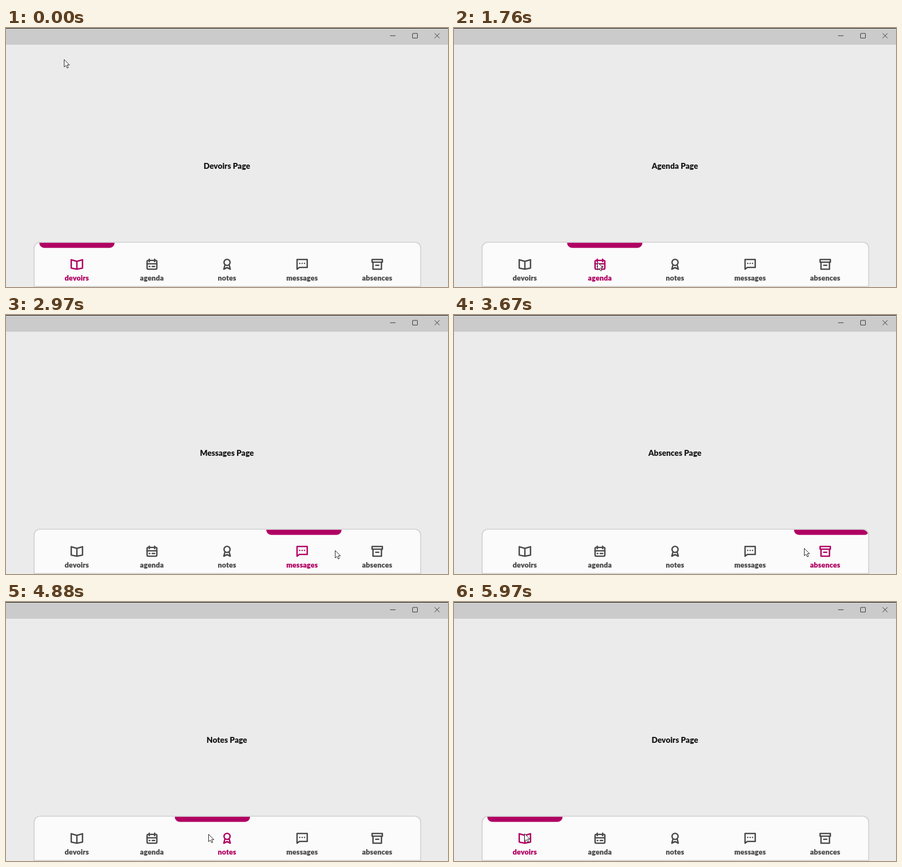
An HTML page for the animation above (6 s loop, 817x480 px).

```html
<!DOCTYPE html>
<html lang="fr">
<head>
<meta charset="utf-8">
<title>Navigation</title>
<style>
  html, body { margin: 0; width: 100%; height: 100%; overflow: hidden; background: #ebebeb; }
  svg { display: block; width: 817px; height: 480px; }
  text { font-family: Lato, "Open Sans", sans-serif; font-weight: 900; text-anchor: middle; }
  .title { font-size: 14.6px; fill: #151515; }
  .label { font-size: 13px; letter-spacing: .3px; fill: currentColor; stroke: currentColor; stroke-width: .25; }
  .icon { fill: none; stroke: currentColor; stroke-width: 2.6; stroke-linejoin: round; stroke-linecap: round; }
  .win { fill: none; stroke: #333; stroke-width: 1; }
</style>
</head>
<body>
<svg viewBox="0 0 817 480">
  <defs>
    <clipPath id="inner"><path d="M53 478V408a10 10 0 0 1 10-10H755.5a10 10 0 0 1 10 10V478z"/></clipPath>
  </defs>
  <rect width="817" height="480" fill="#ebebeb"/>
  <rect width="817" height="31" fill="#cbcbcb"/>
  <rect width="817" height="1" fill="#111"/>
  <g class="win">
    <path d="M710 14.3h10M792.3 9.8l9 9M801.3 9.8l-9 9"/>
    <rect x="751.5" y="10" width="9" height="8.7" rx=".5"/>
  </g>
  <text class="title" id="title" x="408.3" y="261"></text>
  <path d="M52 479V408a11 11 0 0 1 11-11H755.5a11 11 0 0 1 11 11V479z" fill="#fbfbfb" stroke="#d0d0d0" stroke-width="1.7"/>
  <g clip-path="url(#inner)">
    <rect id="bar" y="380" width="139" height="27.5" rx="9" fill="#b00062"/>
  </g>
  <g id="tabs"></g>
  <path id="cursor" d="M.5 .5V14.2L3.7 11.3 6 16.2 8.2 15.2 6 10.4H10.2z" fill="#fff" stroke="#222"/>
</svg>
<script>
const LOOP = 6000, SLIDE = 440, FIRST = 61.6, STEP = 138.8;
const GREY = [74, 74, 74], PINK = [176, 0, 98];

// Icons are drawn around the centre of each tab
const box = (w, top, bottom, r) =>
  `<rect x="${-w / 2}" y="${top}" width="${w}" height="${bottom - top}" rx="${r}"/>`;
const line = d => `<path d="${d}"/>`;
const tabs = [
  ['devoirs', line('M0-5.6L-10.4-8.6V7L0 9L10.4 7V-8.6zV9')],
  ['agenda', box(18, -7.3, 9, 2) + line('M-5-9.5V-5M5-9.5V-5M-9-1H9M-5 4h1M.5 4H5')],
  ['notes', '<circle cy="-3.6" r="5.6"/>' + line('M-4 1.5L-6 9L0 6L6 9L4 1.5')],
  ['messages', line('M-9.4 9V-9H9.4V5.8H-5.2zM-4.4-1.8h0M0-1.8h0M4.4-1.8h0')],
  ['absences', box(19, -9, -4, 0) + line('M-7.8-4V9H7.8V-4M-2.8 1.8H2.8')]
];

// [ms, tab]
const clicks = [[0, 0], [1430, 1], [2570, 3], [3370, 4], [4640, 2], [5520, 0]];

// Pointer moves: [from ms, to ms, x, y]
const home = [108, 57];
const moves = [
  [0, 250, 2, 230], [250, 560, 136, 440], [610, 800, 130, 490], [800, 1180, 310, 490],
  [1180, 1420, 265, 434], [1880, 2440, 517, 444], [2700, 3300, 647, 432],
  [3790, 4370, 375, 430], [4880, 5440, 130, 429]
];

const get = id => document.getElementById(id);
const lerp = (a, b, p) => a + (b - a) * p;
const clamp = v => Math.min(1, Math.max(0, v));
const easeOut = p => 1 - (1 - p) ** 2;

// Ease out with a 10% overshoot
function easeOutBack(p) {
  const s = 1.7, q = clamp(p) - 1;
  return 1 + (s + 1) * q ** 3 + s * q ** 2;
}

function pointerAt(t) {
  return moves.reduce(([px, py], [from, to, x, y]) => {
    const p = easeOut(clamp((t - from) / (to - from)));
    return [lerp(px, x, p), lerp(py, y, p)];
  }, home);
}

get('tabs').innerHTML = tabs.map(([name, icon], i) => {
  const x = 131 + STEP * i;
  return `<g><g class="icon" transform="translate(${x} 438)">${icon}</g>` +
    `<text class="label" x="${x}" y="468">${name}</text></g>`;
}).join('');
const groups = [...get('tabs').children];

function draw(t) {
  const n = clicks.filter(c => c[0] <= t).length - 1;
  const [start, now] = clicks[n];
  const before = n ? clicks[n - 1][1] : now;
  const age = t - start;

  get('bar').setAttribute('x', FIRST + STEP * lerp(before, now, easeOutBack(age / SLIDE)));
  const name = tabs[now][0];
  get('title').textContent = name[0].toUpperCase() + name.slice(1) + ' Page';

  const fade = clamp((age - 90) / 130);
  groups.forEach((g, i) => {
    const on = lerp(+(i === before), +(i === now), fade);
    g.style.color = `rgb(${GREY.map((c, k) => Math.round(lerp(c, PINK[k], on)))})`;
  });

  const [x, y] = pointerAt(t).map(Math.round);
  get('cursor').setAttribute('transform', `translate(${x} ${y})`);
}

const begin = performance.now();
function tick() {
  draw((performance.now() - begin) % LOOP);
  requestAnimationFrame(tick);
}
tick();
</script>
</body>
</html>
```
